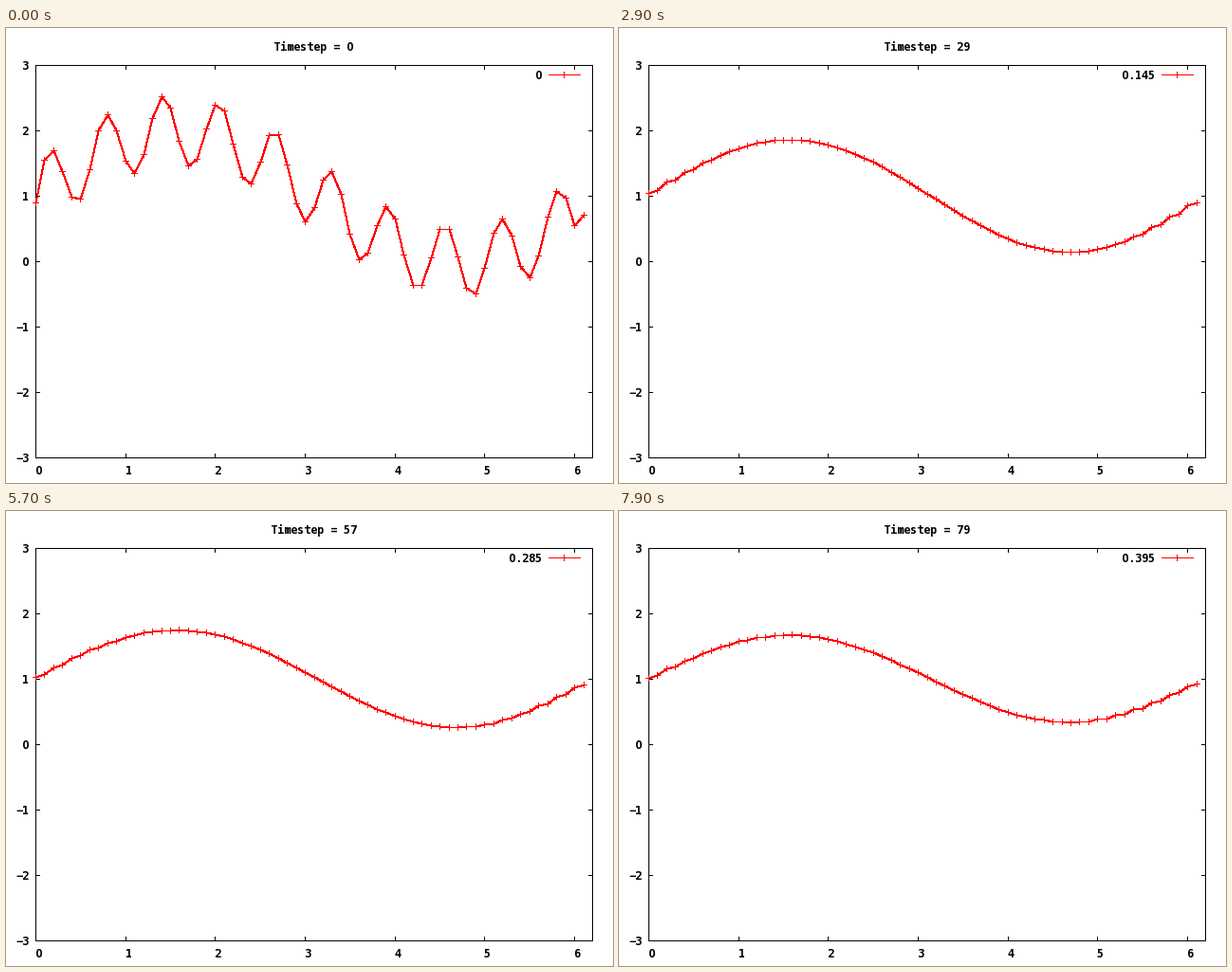
Animation of 640x480 px, one loop 8 s. Source, as a matplotlib script:

```python
import numpy as np
import matplotlib.pyplot as plt
from matplotlib.animation import FuncAnimation

plt.rcParams.update({
    "path.simplify": False,
    "text.hinting": "force_autohint",
    "text.hinting_factor": 1,
    "font.family": "DejaVu Sans Mono",
    "font.weight": "bold",
})

DPI = 80
PX = 72 / DPI  # points per pixel
W, H = 640, 480
LEFT, RIGHT, TOP, BOTTOM = 31, 618, 39, 453
X_MAX, Y_MAX = 6.2, 3
CELL = 7  # text advance in pixels
STEPS, DT, DX, N = 80, 0.005, 0.1, 62


def px(x):
    return np.floor(LEFT + np.asarray(x) * (RIGHT - LEFT) / X_MAX + 0.5)


def py(y):
    return np.floor(BOTTOM - (np.asarray(y) + Y_MAX) * (BOTTOM - TOP) / (2 * Y_MAX) + 0.5)


def hseg(x0, x1, y):
    return [(x0, y + 0.5), (x1 + 1, y + 0.5), (np.nan, np.nan)]


def vseg(x, y0, y1):
    return [(x + 0.5, y0), (x + 0.5, y1 + 1), (np.nan, np.nan)]


def plus(x, y):
    return hseg(x - 3, x + 3, y) + vseg(x, y - 3, y + 3)


def solve():
    """Periodic heat equation, explicit scheme."""
    x = np.arange(N) * DX
    u = 1 + np.sin(x) + np.sin(10 * x)
    r = DT / DX**2
    states = []
    for _ in range(STEPS):
        u = u + r * (np.roll(u, 1) - 2 * u + np.roll(u, -1))
        states.append(u)
    return x, states


fig = plt.figure(figsize=(W / DPI, H / DPI), dpi=DPI, facecolor="white")
ax = fig.add_axes([0, 0, 1, 1])
ax.set(xlim=(0, W), ylim=(H, 0))
ax.axis("off")


def stroke(points, color):
    xs, ys = zip(*points) if len(points) else ((), ())
    line, = ax.plot(xs, ys, color=color, lw=PX, antialiased=False,
                    solid_capstyle="butt", scalex=False, scaley=False)
    line.set_snap(False)
    return line


def plain(s):
    # The font dots its zero; the letter O is the open form.
    return s.replace("0", "O").replace("-", "\u2212")


def label(x, baseline, s=""):
    return ax.text(x, baseline, plain(s), fontsize=11.63 * PX, color="black",
                   ha="left", va="baseline")


frame = (hseg(LEFT, RIGHT, TOP) + hseg(LEFT, RIGHT, BOTTOM)
         + vseg(LEFT, TOP, BOTTOM) + vseg(RIGHT, TOP, BOTTOM))
for k in range(7):
    tx = float(px(k))
    frame += vseg(tx, TOP, TOP + 4) + vseg(tx, BOTTOM - 4, BOTTOM)
    label(tx, 471, str(k))
for k in range(-3, 4):
    ty, s = float(py(k)), str(k)
    frame += hseg(LEFT, LEFT + 4, ty) + hseg(RIGHT - 4, RIGHT, ty)
    label(24 - CELL * len(s), ty + 5, s)
stroke(frame, "black")

stroke(hseg(572, 605, 49) + plus(588, 49), "red")
curve = stroke([], "red")
marks = stroke([], "red")
title = label(0, 24)
key = label(0, 54)

grid, states = solve()
cols = px(grid)


def update(i):
    rows = py(states[i])
    curve.set_data(cols + 0.5, rows + 0.5)
    marks.set_data(*zip(*(p for c, r in zip(cols, rows) for p in plus(c, r))))

    s = f"Timestep = {i}"
    title.set_text(plain(s))
    title.set_x(int((LEFT + RIGHT - CELL * len(s)) / 2))

    s = f"{i * DT:g}"
    key.set_text(plain(s))
    key.set_x(565 - CELL * len(s))
    return curve, marks, title, key


anim = FuncAnimation(fig, update, frames=STEPS, interval=100,
                     repeat=True, repeat_delay=0, blit=False)
plt.show()
```
